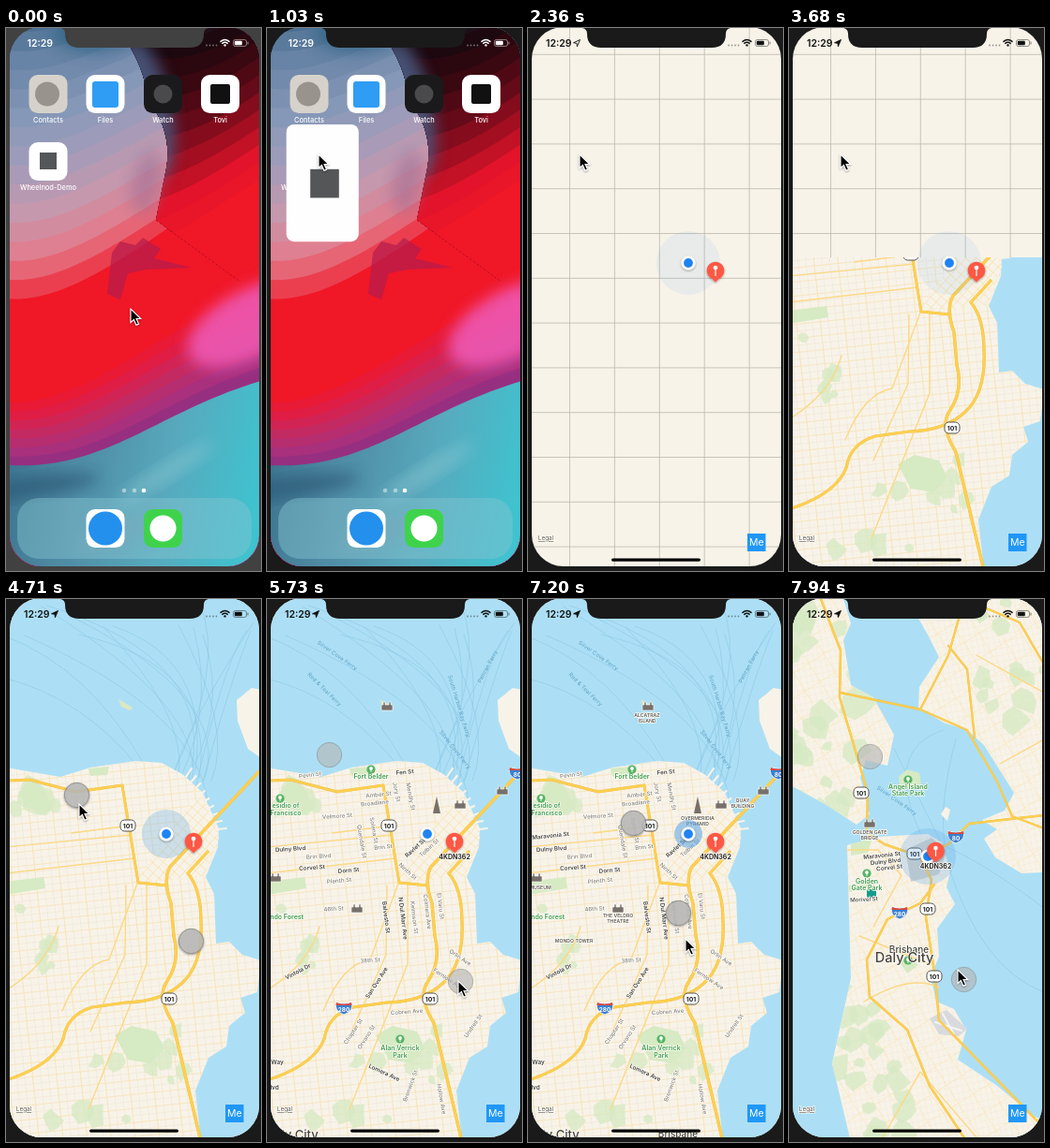
An HTML page that plays this animation: 272x580 px, repeating every 8 s.

```html
<!DOCTYPE html>
<html lang="en">
<head>
<meta charset="utf-8">
<title>Phone map</title>
<style>
html, body { margin: 0; width: 100%; height: 100%; overflow: hidden; background: #1a1a1a; }
svg { display: block; width: 100vw; height: 100vh; font-family: Inter, "Liberation Sans", sans-serif; }
.road { fill: none; stroke-linecap: round; stroke-linejoin: round; }
.label { paint-order: stroke; stroke: #fffdf8; stroke-width: 1.5px; stroke-linejoin: round; }
</style>
</head>
<body>
<svg id="stage" viewBox="0 0 272 580"></svg>
<script>
const LOOP = 8000, STEP = 147;
const WATER = '#acdff5', LAND = '#f8f3e9', GREEN = '#d6eac3', YELLOW = '#fdd050';
const MINOR = '#85817b', MAJOR = '#45423e', NOTE = '#5f5a54', LEAF = '#3f9c50', SEA = '#5a9dc2';

const range = n => [...Array(n).keys()];
const each = (list, draw) => list.map(draw).join('');
const mix = (a, b, p) => a + (b - a) * p;
const ramp = (t, from, to) => Math.min(1, Math.max(0, (t - from) / (to - from)));
const ease = p => p * p * (3 - 2 * p);

function seeded(seed) {
  return () => (seed = (seed * 16807) % 2147483647) / 2147483647;
}

// Drawing helpers
const text = (x, y, s, size, fill, extra = '') =>
  `<text x="${x}" y="${y}" font-size="${size}" fill="${fill}" text-anchor="middle" ${extra}>${s}</text>`;
const shape = (d, fill, extra = '') => `<path d="${d}" fill="${fill}" ${extra}/>`;
const line = (d, stroke, w, extra = '') => `<path class="road" d="${d}" stroke="${stroke}" stroke-width="${w}" ${extra}/>`;
const box = (x, y, w, h, r, fill, extra = '') =>
  `<rect x="${x}" y="${y}" width="${w}" height="${h}" rx="${r}" fill="${fill}" ${extra}/>`;
const dot = (x, y, r, fill, extra = '') => `<circle cx="${x}" cy="${y}" r="${r}" fill="${fill}" ${extra}/>`;
const group = (id, body, extra = '') => `<g id="${id}" ${extra}>${body}</g>`;
const clip = (id, body) => `<g clip-path="url(#${id})">${body}</g>`;
const fullBox = fill => box(0, 0, 272, 580, 0, fill);
const pattern = (id, w, h, rot, stroke, width) =>
  `<pattern id="${id}" width="${w}" height="${h}" patternUnits="userSpaceOnUse" patternTransform="rotate(${rot})">
   <path d="M0 0H${w}M0 0V${h}" stroke="${stroke}" stroke-width="${width}"/></pattern>`;
const gradient = (id, x2, y2, colors) => `<linearGradient id="${id}" x1="0" y1="0" x2="${x2}" y2="${y2}">` +
  each(colors, (c, i) => `<stop offset="${i / (colors.length - 1)}" stop-color="${c}"/>`) + '</linearGradient>';

// Map helpers
const label = (x, y, s, { rot = 0, fill = MINOR, size = 6.2, weight = 500 } = {}) =>
  text(x, y, s, size, fill, `class="label" font-weight="${weight}" transform="rotate(${rot} ${x} ${y}) translate(0 2)"`);
const series = (names, x, y, dx, dy, style) =>
  each(names.split('|'), (s, i) => label(x + i * dx, y + i * dy, s, style));
const bold = rot => ({ rot, fill: MAJOR, size: 6.3, weight: 600 });
const park = { fill: LEAF, size: 7, weight: 600 };
const note = { fill: NOTE, size: 5.2, weight: 600 };
const town = size => ({ fill: MAJOR, size, weight: 500 });
const ferryName = (x, y, s, rot) => text(x, y, s, 5.8, SEA, `transform="rotate(${rot} ${x} ${y})" letter-spacing=".2"`);
const highway = (d, w) => line(d, '#eebc4a', w + .6) + line(d, YELLOW, w);
const street = d => line(d, '#fbd987', 1.4);
const tree = (x, y) => dot(x, y, 4.6, '#55b464') + dot(x, y - 1, 1.9, '#fff') + line(`M${x} ${y}v2.6`, '#fff', .9);
const shield = (x, y) => box(x - 8, y - 6, 16, 12, 4.5, '#fff', 'stroke="#55514b" stroke-width="1"') +
  text(x, y + 2.5, '101', 6.8, '#222', 'font-weight="700"');
const interstate = (x, y, s) =>
  shape(`M${x - 8} ${y - 6}q8 3 16 0q3 9-8 13q-11-4-8-13z`, '#3c7fd0', 'stroke="#fff" stroke-width=".8"') +
  shape(`M${x - 8} ${y - 6}q8 3 16 0l.6 3h-17.2z`, '#d9483f') + text(x, y + 4, s, 6.4, '#fff', 'font-weight="700"');
const landmark = (x, y) => shape(`M${x - 6} ${y + 4}v-6h2v-3h2v3h4v-3h2v3h2v6z`, '#77706a', 'stroke="#fff" stroke-width=".6"');

// Random patches of parkland inside a rectangle.
function meadows(count, x, y, w, h, size, seed) {
  const rnd = seeded(seed);
  return each(range(count), () => {
    const px = x + rnd() * w, py = y + rnd() * h, r = size * (.5 + rnd());
    const d = each(range(7), k => {
      const a = k / 7 * Math.PI * 2, q = r * (.6 + .6 * rnd());
      return `${k ? 'L' : 'M'}${(px + q * Math.cos(a)).toFixed(1)} ${(py + q * Math.sin(a)).toFixed(1)}`;
    });
    return shape(d + 'Z', GREEN, 'opacity=".75"');
  });
}

// Stacked ribbons whose upper edge and colour blend from one cubic curve to another.
function ribbons(count, top, bottom, colors) {
  return each(range(count), i => {
    const p = i / (count - 1), c = p * (colors.length - 1), k = Math.min(Math.floor(c), colors.length - 2);
    const [x0, y0, ...rest] = top.map((v, j) => mix(v, bottom[j], p).toFixed(1));
    const rgb = [1, 3, 5].map(o => Math.round(mix(...[k, k + 1].map(n => parseInt(colors[n].substr(o, 2), 16)), c - k)));
    return shape(`M${x0} ${y0}C${rest}V600H${x0}Z`, `rgb(${rgb})`);
  });
}

const cityLand = 'M0 180L58 190 90 180 138 173 166 175 188 187 210 207 227 245 226 265 213 297 222 315 224 368 238 366 ' +
  '252 380 272 386 268 420 250 426 255 442 238 456 235 478 216 490 202 525 208 580H0Z';
const soma = 'M139 302L190 226 208 210 227 255 212 295 178 300Z';
const regionLand = 'M0 0H58L66 26 58 44 66 92 90 105 112 145 105 178 82 172 76 190 86 230 72 241 40 220 0 198Z' +
  'M62 263L95 254 148 251 163 260 172 290 168 308 177 326 158 352 160 382 151 403 157 430 176 438 189 460 180 492 222 520 262 553 272 556V580H66L46 496 66 405Z' +
  'M126 0H272V292L248 293 220 276 208 256 222 246 206 236 230 226 240 207 208 156 190 140 165 132 138 116 139 94 160 62 148 38Z';

const defs = `<defs>
  <clipPath id="screen">${box(4, -1, 266, 576, 34, '#fff')}</clipPath>
  <clipPath id="lower"><rect id="lowerBox" width="272" height="580"/></clipPath>
  <clipPath id="cityClip"><path d="${cityLand}"/></clipPath>
  <clipPath id="regionClip"><path d="${regionLand}"/></clipPath>
  <clipPath id="ridge"><path d="M112-10Q150 40 150 75Q178 110 171 150L160 205L290 300V-10Z"/></clipPath>
  <filter id="soft" x="-40%" y="-40%" width="180%" height="180%"><feGaussianBlur stdDeviation="8"/></filter>
  <filter id="shade" x="-50%" y="-50%" width="200%" height="200%"><feDropShadow dx="0" dy="1" stdDeviation="1.2" flood-opacity=".4"/></filter>
  ${gradient('sea', 1, .15, ['#356b87', '#4e8aa3', '#58a9bd', '#3fc3cf'])}
  ${pattern('blocks', 8.5, 7.5, -6, '#e8decb', .8)}
  ${pattern('avenues', 25.5, 15, -6, '#fbe3a8', 1.2)}
  ${pattern('diagonal', 8, 8, 42, '#f9dc98', 1)}
  ${pattern('fine', 6, 7, -12, '#efe4cb', .7)}
  ${pattern('coarse', 19, 23, -32, '#fbe2a6', .9)}
</defs>`;

const blob = (x, y, rx, ry, rot, fill, alpha) =>
  `<ellipse rx="${rx}" ry="${ry}" transform="translate(${x} ${y}) rotate(${rot})" fill="${fill}" opacity="${alpha}" filter="url(#soft)"/>`;
const wallpaper = fullBox('#4d7194') +
  ribbons(16, [-10, -20, 60, 0, 120, -60, 290, -90], [-10, 288, 60, 300, 130, 245, 290, 130],
    ['#4d7194', '#6d87a9', '#8698b7', '#a29cb9', '#c598ae', '#e47a8a', '#f01727']) +
  blob(95, 5, 45, 22, 0, '#2d6384', .7) +
  clip('ridge', ribbons(13, [90, -60, 150, -20, 220, -10, 290, -80], [90, 245, 170, 240, 220, 190, 290, 150],
    ['#201622', '#1d080f', '#390811', '#640a18', '#a30e21', '#e2132a', '#f01727']) +
    blob(150, 85, 26, 75, -12, '#4a587e', .9)) +
  blob(150, 165, 16, 35, 12, '#9c6f96', .55) +
  shape('M113 240L122 228 138 232 146 224 165 236 158 246 198 256 150 258 130 262 122 290 108 284Z', '#b41c4d', 'opacity=".7"') +
  ribbons(9, [-10, 390, 70, 400, 150, 320, 290, 250], [-10, 466, 110, 478, 160, 405, 290, 372],
    ['#f01727', '#df1d45', '#c42a62', '#a8307d', '#852d82']) +
  blob(262, 315, 75, 36, -28, '#f05cb8', .85) +
  shape('M-10 466C110 478 160 405 290 372V600H-10Z', 'url(#sea)') +
  blob(30, 490, 70, 10, -8, '#2b5673', .7) + blob(170, 475, 60, 8, -32, '#86c6d2', .6) +
  blob(120, 540, 50, 12, -20, '#6998ac', .7);

const appTile = (x, y, tile, name, mark) => box(x, y, 41, 41, 9.5, tile) + mark +
  text(x + 20.5, y + 51, name, 7.4, '#fff', 'font-weight="500"');
const home = wallpaper +
  appTile(24.5, 50, '#d6d2cb', 'Contacts', dot(44, 70.5, 13, '#98938c')) +
  appTile(85.5, 50, '#fff', 'Files', box(92, 57, 28, 28, 3, '#2f9df4')) +
  appTile(147, 50, '#1a1a1c', 'Watch', dot(167.5, 70.5, 10, '#4a4a4d')) +
  appTile(208, 50, '#fff', 'Tovi', box(218, 60, 21, 21, 2, '#111')) +
  appTile(24.5, 122, '#fff', 'Wheelnod-Demo', box(36, 133, 18, 18, 0, '#555658')) +
  box(24.5, 122, 41, 41, 9.5, '#000', 'id="press" opacity=".4"') +
  each([126, 137, 147], (x, i) => dot(x, 494, 2.3, '#fff', `opacity="${i < 2 ? .45 : 1}"`)) +
  box(12, 502, 250, 65, 23, '#86c3d0', 'opacity=".45"') +
  appTile(85.5, 514, '#fff', '', dot(106, 534.5, 18, '#2490ee')) +
  appTile(147, 514, '#3fd34c', '', dot(167.5, 534.5, 14, '#fff'));

const lattice = each(range(12), i => `M${44.5 + i * 47.9} 0V580M0 ${28.3 + i * 47.8}H272`);

// Ferry routes fan out from the waterfront.
function ferryRoutes(count) {
  const rnd = seeded(41);
  return each(range(count), () => {
    const x = 20 + rnd() * 260, bend = 190 + rnd() * 60;
    return `M${x.toFixed()} ${(rnd() * 40).toFixed()}Q${bend.toFixed()} ${(60 + rnd() * 80).toFixed()} ${(170 + rnd() * 55).toFixed()} ${(180 + rnd() * 50).toFixed()}`;
  });
}
const piers = each(range(9), i => `M${192 + i * 4.2} ${190 + i * 7}l${6 + i * .4} ${i - 9}`);

const city = fullBox(WATER) + line(ferryRoutes(14) + 'M0 85Q80 105 140 178M0 40Q90 75 148 178', '#91cbe8', .7) +
  line(piers, LAND, 2.2) + shape('M246 108L262 95 272 97V170L258 160 247 130Z', LAND) + shape('M120 107l15 9-3 3-9-4z', '#dde7c2') +
  each([LAND, 'url(#blocks)', 'url(#avenues)'], f => shape(cityLand, f)) +
  shape(soma, LAND) + shape(soma, 'url(#diagonal)') +
  clip('cityClip', meadows(8, 10, 195, 45, 32, 12, 7) + meadows(8, 15, 330, 40, 65, 8, 23) + meadows(12, 50, 450, 140, 110, 9, 91)) +
  shape('M0 302L40 297 42 309 0 316ZM88 181L110 179 108 188 90 189Z', GREEN) +
  shape('M116 466L134 456 160 462 169 480 154 496 130 492Z', GREEN) +
  street('M70 250L132 242M0 265L134 252M0 293L137 277M60 440Q80 390 110 385L140 304M128 306L127 380 90 462M150 305V390L88 545M0 418Q45 390 56 350') +
  highway('M0 194L25 193 75 206 124 199 141 303 172 306', 2.3) +
  highway('M272 182L175 286Q167 300 176 325L179 360Q186 387 172 408Q160 424 178 453L208 580', 2.8) +
  highway('M215 270L194 293Q208 310 208 345Q210 390 188 410Q167 430 128 431L92 436Q65 444 61 470Q50 498 0 514', 2.6) +
  shield(130, 242) + shield(174, 427);

const names =
  label(46, 188, 'Pevin St', { rot: -8 }) + label(147, 185, 'Fen St', bold(-5)) +
  series('Amber St|Broadlane', 119, 209, -4, 9, { rot: -6 }) + series('Jory St|Mendly St', 138, 206, 15, 5, { rot: 79 }) +
  series('Solena St|Quendale St', 114, 247, -13, 12, { rot: 80 }) + label(124, 265, 'Brin St', { rot: -6 }) +
  series('Velmore St|Brin Blvd', 75, 232, -20, 43, { rot: -4 }) + label(77, 301, 'Plenth St', { rot: -5 }) +
  series('Dulny Blvd|Corvel St', 25, 267, 23, 20, bold(-4)) + label(87, 290, 'Dorn St', bold(-5)) +
  label(158, 266, 'Ravlet St', bold(-42)) + label(173, 266, 'Tolbin St', { rot: -42 }) + label(150, 291, 'Ninth St', { rot: 42 }) +
  series('Balvesto St|N Dul Marr Ave', 127, 340, 18, 1, bold(83)) +
  series('Kelmison St|Colmera Ave|El Varu St', 157, 340, 14, -6, { rot: 83 }) +
  series('46th St|38th St|Cobren Ave', 71, 331, 39, 55, { rot: -4 }) +
  series('Chapter St|Orvano St', 92, 462, 14, 6, { rot: -57 }) + label(117, 410, 'San Ovo Ave', bold(-57)) +
  label(33, 398, 'Vintola Dr', bold(-28)) + label(125, 506, 'Lomera Ave', bold(25)) +
  label(153, 520, 'Brenwick St', { rot: -70 }) + label(186, 534, 'Hollow Ave', { rot: 80 }) + label(220, 456, 'Undrell St', { rot: -55 }) +
  series('Orlin Ave|Fernlow Ave', 206, 383, -13, 23, { rot: 34 }) + series('Way|lvd', 11, 495, -3, 27, bold(0)) +
  ferryName(74, 62, 'Silver Cove Ferry', 35) + ferryName(60, 98, 'Red &amp; Teal Ferry', 45) +
  ferryName(203, 115, 'South Harbor Bay Ferry', 73) + ferryName(237, 73, 'Pelican Ferry', -62) + ferryName(199, 162, 'Silver Cove Ferry', 52) +
  label(111, 190, 'Fort Belder', park) + series('esidio of|Francisco', 20, 221, 0, 8, park) +
  series('Alan Verrick|Park', 142, 480, 0, 8, park) + label(19, 340, 'ondo Forest', park) +
  tree(111, 182) + tree(14, 213) + tree(142, 470) +
  landmark(128, 115) + landmark(96, 331) + landmark(206, 220) + landmark(251, 205) + landmark(9, 298) +
  shape('M177 229l4-18 4 18z', '#77706a') + interstate(82, 437, '280') + interstate(267, 186, '80');

const captions = series('ALCATRAZ|ISLAND', 127, 124, 0, 6, note) + series('OVERMERIDIA|PYRAMID', 181, 234, 0, 6, note) +
  series('QUAY|BUILDING', 229, 215, 0, 6, note) + series('THE VELDRO|THEATRE', 96, 338, 0, 6, note) +
  label(13, 308, 'MUSEUM', note) + label(49, 365, 'MONDO TOWER', note) +
  label(24, 253, 'Maravonia St', bold(-6)) + label(160, 573, 'Brisbane', town(10));

const region = fullBox(WATER) +
  line('M112 160Q150 235 162 260M165 140Q100 160 140 250M178 150Q160 215 166 262M272 330Q205 280 168 265M170 285Q205 395 272 420', '#91cbe8', .7) +
  shape(regionLand, LAND) +
  clip('regionClip', fullBox('url(#fine)') + fullBox('url(#coarse)') +
    meadows(30, 0, 0, 75, 235, 13, 17) + meadows(22, 50, 400, 75, 180, 12, 53) + meadows(14, 205, 0, 70, 130, 11, 77) +
    shape('M62 306l30-4v7l-30 4zM66 258h22l-4 13-18 3zM118 388l12-6 8 9-12 9z', GREEN) +
    shape('M124 268l28-13 16 14-8 25-30 8z', '#d5d2cb')) +
  shape('M117 190l9-8 13 4 2 11-12 7-11-5z', GREEN) + shape('M162 230l5-8 5 3-3 12z', LAND) +
  shape('M150 448l18-9 22 20-9 8-21-2z', '#d9dadd') + line('M156 452l28 9M164 443l12 22', '#f4f4f4', 2) +
  street('M62 268L95 268 120 295 90 350M75 360L150 390M80 430Q130 400 160 415M200 60L272 100M225 176L272 150M100 575L140 505 200 575') +
  highway('M34 0L55 55 54 105 84 207 83 250 102 262 140 275 152 300 146 340 156 405 160 450 272 565', 1.9) +
  highway('M55 100L140 118 190 140 222 195 238 232 272 245M140 118L170 60 187 0M170 50L190 75 198 148M187 0L246 25 272 70', 1.7) +
  highway('M140 275L170 262 192 240 272 231M155 305L140 325 105 342 83 385 86 425 126 460 150 520 190 580', 1.9) +
  shield(77, 207) + shield(134, 272) + shield(148, 331) + shield(155, 403) +
  interstate(118, 335, '280') + interstate(178, 254, '80') + tree(127, 193) + tree(83, 293) + tree(127, 386) +
  box(83, 310, 10, 9, 2, '#169b8c') + landmark(86, 240) + ferryName(114, 217, 'Silver Cove Ferry', 35) +
  series('Angel Island|State Park', 127, 201, 0, 7, park) + series('Golden|Gate Park', 83, 302, 0, 7, park) +
  series('GOLDEN GATE|BRIDGE', 86, 249, 0, 6, note) + series('Maravonia St|Dulny Blvd|Corvel St', 99, 274, 4, 6.5, bold(-6)) +
  label(80, 321, 'Morivel St', { rot: -3, fill: MAJOR }) + label(128, 376, 'Brisbane', town(10)) + label(123, 386, 'Daly City', town(14.5));

const marker = group('me', dot(0, 0, 0, '#5ba4e6', 'id="halo"') + dot(0, 0, 7.6, '#fff', 'filter="url(#shade)"') + dot(0, 0, 4.9, '#1f83f4')) +
  group('pin', shape('M0 12L-4 8A9.3 9.3 0 1 1 4 8Z', '#fd5844', 'filter="url(#shade)"') +
    dot(0, -3.5, 2.3, '#fff') + line('M0-2V5', '#fff', 1.2) + group('plate', label(0, 16, '4KDN362', { fill: '#292725', size: 7, weight: 700 })));
const controls = text(19, 547, 'Legal', 6.4, NOTE, 'class="label" text-decoration="underline"') +
  box(234, 540, 19.5, 19, 0, '#2097f6') + text(243.8, 553.2, 'Me', 10.5, '#fff');

const status = `<text id="clock" y="20" font-size="10.5" font-weight="600" fill="currentColor">12:29</text>` +
  `<path id="arrow" d="M55.5 12.5L48.5 15.8 52 16.3 52.4 19.8Z" stroke="currentColor" stroke-width=".9" stroke-linejoin="round"/>` +
  each(range(4), i => dot(214 + i * 3.5, 18.5, .9, 'currentColor', 'opacity=".4"')) +
  line('M229 14.4Q233.5 10.6 238 14.4M230.8 16.4Q233.5 14.2 236.2 16.4', 'currentColor', 1.5) + dot(233.5, 18.4, 1.2, 'currentColor') +
  box(242.5, 12.5, 14, 7, 2, 'none', 'stroke="currentColor" stroke-width=".8" opacity=".55"') +
  box(243.8, 13.8, 8, 4.4, 1, 'currentColor') + box(257.5, 14.5, 1, 3, .5, 'currentColor', 'opacity=".55"');

const stage = document.getElementById('stage');
stage.innerHTML = defs + group('bezel', fullBox('currentColor')) +
  clip('screen', group('home', home) +
    group('map', fullBox(LAND) + line(lattice, '#bcb9ae', .8) + group('city', city, 'clip-path="url(#lower)"') +
      group('names', names + label(35, 575, 'ly City', town(13))) + group('captions', captions) +
      group('region', region) + group('marker', marker) + controls) +
    group('splash', box(0, 0, 0, 0, 0, '#fefefe', 'id="sheet"') + group('mark', box(-46, -52, 108, 108, 0, '#555658'))) +
    group('status', status) + box(89, 566.5, 95, 3.2, 1.6, '#050505', 'id="bar"') +
    group('touches', each(range(2), i => dot(0, 0, 13.2, '#b5b5b5', `id="touch${i}" stroke="#858585"`)))) +
  shape('M58 0Q63 1 63 6Q63 21 78 21H196Q211 21 211 6Q211 1 216 0Z', 'currentColor', 'id="notch"') +
  group('cursor', shape('M0 0V14.5L3.4 11.4 5.9 17.2 8.5 16.1 6 10.5H10.7Z', '#000', 'stroke="#fff" stroke-width="1.1" filter="url(#shade)"'));

const el = Object.fromEntries([...stage.querySelectorAll('[id]')].map(e => [e.id, e]));
const set = (id, attrs) => { for (const k in attrs) el[id].setAttribute(k, attrs[k]); };
const show = (id, on) => { el[id].style.display = on ? '' : 'none'; };
const move = (id, x, y, s = 1) => set(id, { transform: `translate(${x} ${y}) scale(${s})` });

// Eased travel through stops of [time, x, y].
function travel(stops, t) {
  let [, x, y] = stops[0];
  for (let i = 1; i < stops.length; i++) {
    const p = ease(ramp(t, stops[i - 1][0], stops[i][0]));
    x = mix(x, stops[i][1], p);
    y = mix(y, stops[i][2], p);
  }
  return [x, y];
}

const cursorStops = [[0, 133, 300], [588, 55, 135], [3969, 55, 135], [4704, 78, 219], [5733, 204, 408],
  [6174, 204, 408], [7203, 168, 363], [7644, 199, 440], [7938, 180, 396]];
// Offsets of the upper finger from the pinch centre.
const pinchStops = [[4116, -76, -160], [4704, -61, -78], [5733, -70, -121], [6174, -70, -121],
  [7203, -24, -48], [7644, -64, -160], [7938, -50, -119]];

function render(time) {
  const t = Math.floor((time + 5) / STEP) * STEP;
  const between = (a, b) => t >= a && t < b;
  const wide = t >= 7350, dark = t >= 1323;

  el.bezel.style.color = el.notch.style.color = t < 882 ? '#414141' : '#1a1a1a';
  show('home', t < 1470);
  show('press', t >= 882);

  const p = ease(ramp(t, 882, 1470));
  const x = mix(24.5, 0, p), y = mix(122, 0, p), width = mix(41, 272, p), height = mix(41, 580, p);
  show('splash', between(1029, 1911));
  set('splash', { opacity: t >= 1764 ? .5 : 1 });
  set('sheet', { x, y, width, height, rx: 9.5 * (1 - p) });
  move('mark', x + width / 2, y + height / 2, width / 272);

  show('map', t >= 1764);
  show('city', between(3234, 7350));
  set('lowerBox', { y: t < 3969 ? 245 : 0 });
  show('names', between(5145, 7350));
  show('captions', between(6321, 7350));
  show('region', wide);
  show('marker', t >= 2058);
  show('plate', t >= 5145);
  move('me', wide ? 148 : 171, wide ? 275 : 251);
  move('pin', wide ? 156.5 : 200, wide ? 269.5 : 259.5);
  set('halo', {
    r: Math.max(0, 34 * ramp(t, 1911, 2352) - 8 * ramp(t, 3969, 4704) - 26 * ramp(t, 4998, 5292) + 30 * ramp(t, 6909, 7500)),
    opacity: .1 + .18 * ramp(t, 3969, 4704) + .27 * ramp(t, 6909, 7203) - .3 * ramp(t, 7203, 7500)
  });

  el.status.style.color = dark ? '#111' : '#fff';
  set('clock', { x: t < 2058 ? 22.5 : 19 });
  show('arrow', t >= 2058);
  set('arrow', { fill: t < 2646 ? 'none' : 'currentColor' });
  show('bar', dark);

  const [dx, dy] = travel(pinchStops, t), pressed = between(4263, 4998) || between(6174, 7350);
  show('touches', between(4116, 5145) || t >= 5439);
  set('touch0', { cx: 136.5 + dx, cy: 287.5 + dy });
  set('touch1', { cx: 136.5 - dx, cy: 287.5 - dy });
  set('touches', { opacity: pressed ? .88 : .62, filter: pressed ? 'url(#shade)' : 'none' });
  move('cursor', ...travel(cursorStops, t));
}

function tick() {
  render(performance.now() % LOOP);
  requestAnimationFrame(tick);
}
tick();
</script>
</body>
</html>
```
